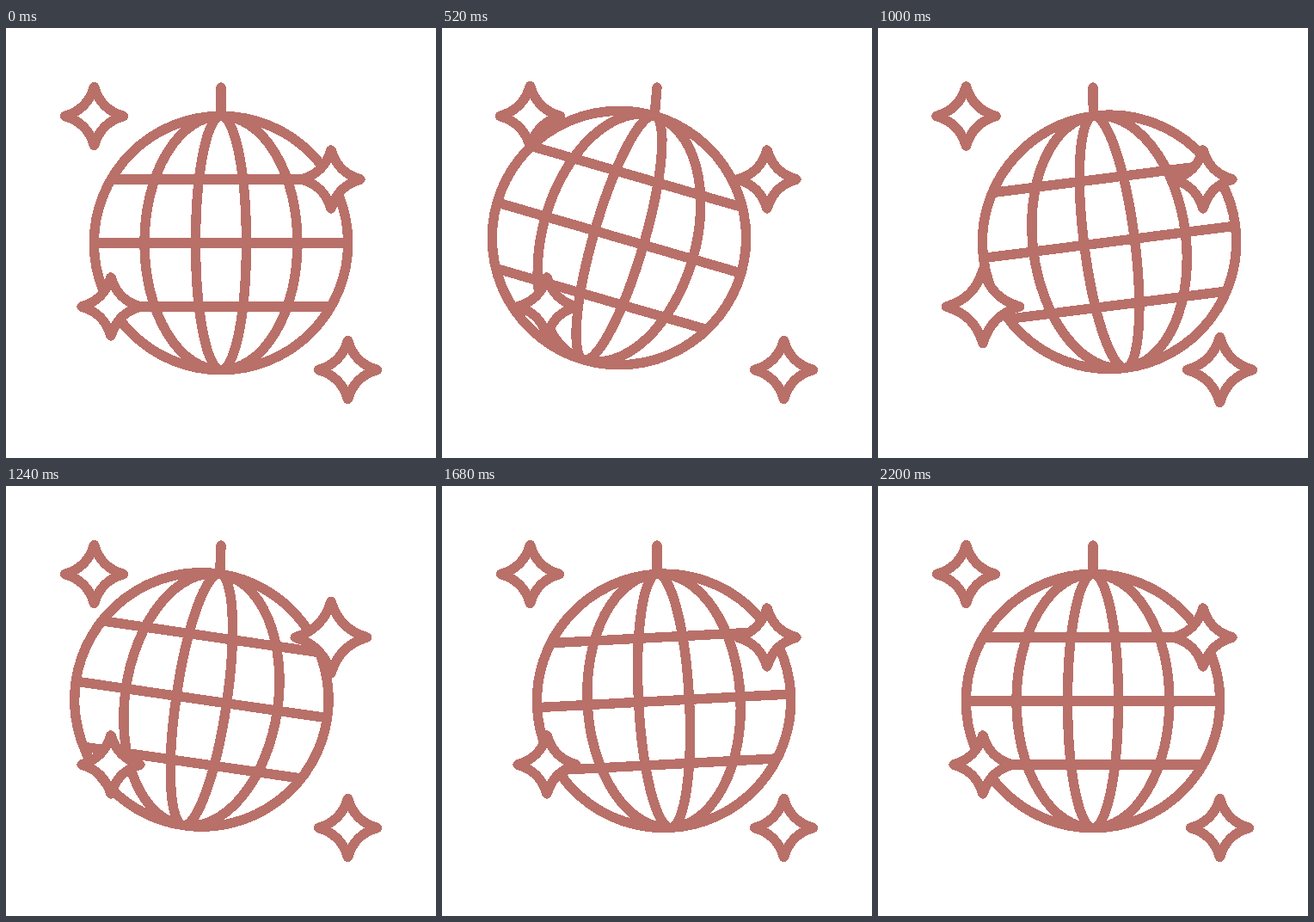
Animation of 500 by 500 pixels, one loop 2.24 s. Source, as an HTML page:

```html
<!DOCTYPE html>
<html lang="en">
<head>
<meta charset="utf-8">
<title>Disco ball</title>
<style>
  html, body { margin: 0; width: 100%; height: 100%; overflow: hidden; background: #fff; }
  svg { display: block; width: 100%; height: 100%; shape-rendering: crispEdges; }
  .line { fill: none; stroke: #b87069; stroke-width: 11.4; stroke-linecap: round; stroke-linejoin: round; }
  .star { fill: #fff; }
</style>
</head>
<body>
<svg viewBox="0 0 500 500">
  <path id="cord" class="line"/>
  <g id="ball" class="line">
    <circle cy="148" r="147.7"/>
    <ellipse cy="148" rx="89" ry="147.7"/>
    <ellipse cy="148" rx="29.5" ry="147.7"/>
    <path stroke-linecap="butt" d="M-147.7 148H147.7M-127.6 74H127.6M-127.6 222H127.6"/>
  </g>
  <g id="stars"></g>
</svg>
<script>
const LOOP = 2240, STEP = 40;

// The ball winds up to its peak tilt, then swings with a fading amplitude.
const WIND_UP = 95, PEAK = 555, REST = 2200, HALF_SWING = 350;
const MAX_TILT = 16.4, FADE = 1.25;

// The cord's lower end moves the same way, slightly ahead of the ball.
const CORD_TOP = 69, CORD_LENGTH = 33, CORD_LEAD = 60, CORD_SWAY = 0.18;

const STAR_SIZE = 34, GROWTH = 10.5, PULSE_HALF = 118, LAST_PULSE = 1900;
const stars = [
  { x: 102.5, y: 102.5, first: 427, gap: 474 },
  { x: 378, y: 176, first: 680, gap: 600 },
  { x: 122, y: 324, first: 265, gap: 768 },
  { x: 397.5, y: 397.5, first: 357, gap: 575 }
];

const cord = document.getElementById("cord");
const ball = document.getElementById("ball");
const sky = document.getElementById("stars");

for (const star of stars) {
  star.node = document.createElementNS("http://www.w3.org/2000/svg", "path");
  star.node.setAttribute("class", "line star");
  star.node.setAttribute("transform", `translate(${star.x} ${star.y})`);
  sky.append(star.node);
}

function tiltAt(t) {
  if (t <= WIND_UP || t >= REST) return 0;
  if (t < PEAK) {
    return MAX_TILT * (1 - Math.cos(Math.PI * (t - WIND_UP) / (PEAK - WIND_UP))) / 2;
  }
  const fade = ((REST - t) / (REST - PEAK)) ** FADE;
  return MAX_TILT * fade * Math.cos(Math.PI * (t - PEAK) / HALF_SWING);
}

function pulseAt({ first, gap }, t) {
  const peak = first + gap * Math.max(0, Math.round((t - first) / gap));
  const u = Math.abs(t - peak) / PULSE_HALF;
  return u < 1 && peak < LAST_PULSE ? Math.cos(u * Math.PI / 2) ** 2 : 0;
}

function starPath(r) {
  const near = r * 0.16, far = r * 0.47;
  return `M0 ${-r}C${near} ${-far} ${far} ${-near} ${r} 0` +
    `C${far} ${near} ${near} ${far} 0 ${r}` +
    `C${-near} ${far} ${-far} ${near} ${-r} 0` +
    `C${-far} ${-near} ${-near} ${-far} 0 ${-r}Z`;
}

function draw(t) {
  const dx = -CORD_SWAY * tiltAt(t + CORD_LEAD);
  const x = 250 + dx, y = CORD_TOP + Math.sqrt(CORD_LENGTH ** 2 - dx ** 2);
  cord.setAttribute("d", `M250 ${CORD_TOP}L${x} ${y}`);
  ball.setAttribute("transform", `translate(${x} ${y}) rotate(${tiltAt(t)})`);
  for (const star of stars) {
    star.node.setAttribute("d", starPath(STAR_SIZE + GROWTH * pulseAt(star, t)));
  }
}

const start = performance.now();
function frame() {
  const t = (performance.now() - start) % LOOP;
  draw(Math.floor(t / STEP) * STEP);
  requestAnimationFrame(frame);
}
draw(0);
requestAnimationFrame(frame);
</script>
</body>
</html>
```
